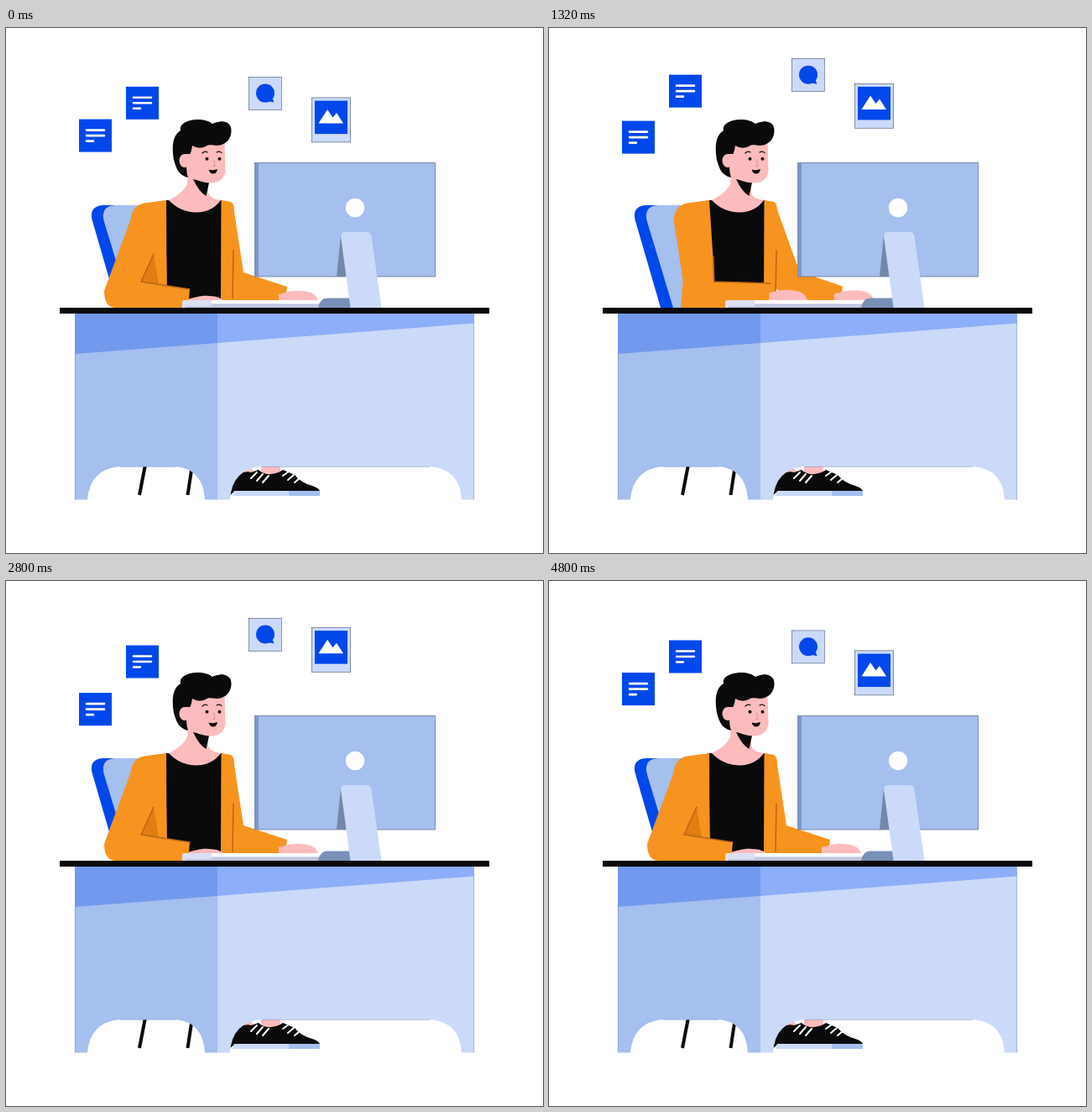
Recreate the animation shown at these times as an HTML page. Size 640 by 625 pixels, loop 4840 ms.

```html
<!DOCTYPE html>
<html lang="en">
<head>
<meta charset="utf-8">
<title>At the desk</title>
<style>
html, body { margin: 0; width: 100%; height: 100%; overflow: hidden; background: #fff; }
svg { display: block; width: 640px; height: 625px; }
.blue { fill: #0048ea; }
.mid { fill: #a5bfee; }
.pale { fill: #cbdaf9; }
.ink { fill: #0a0a0a; }
.skin { fill: #fcbcbd; }
.coat { fill: #f79420; }
.edge { stroke: #47566f; stroke-width: .6; }
.line { fill: none; stroke-linecap: round; stroke-linejoin: round; }
.white { stroke: #fff; stroke-width: 2.6; }
.crease { stroke: #b8651a; stroke-width: 1.5; }
</style>
</head>
<body>
<svg viewBox="0 0 640 625">
  <defs>
    <g id="note">
      <rect class="blue" width="39" height="39"/>
      <path class="line white" d="M9 13H30M9 19.5H30M9 26H17"/>
    </g>
    <path id="hand" class="skin" d="M-2 8C8 6 14 3 24 4C36 4 45 9 45 17V25H-2Z"/>
  </defs>

  <use id="noteA" href="#note"/>
  <use id="noteB" href="#note"/>
  <g id="bubble">
    <rect class="pale edge" x=".3" y=".3" width="39" height="39"/>
    <circle class="blue" cx="20" cy="19.5" r="11"/>
    <path class="blue" d="M23 29L30.500 30.500L28 24Z"/>
  </g>
  <g id="photo">
    <rect class="pale edge" x=".3" y=".3" width="46.400" height="53"/>
    <rect class="blue" x="4" y="4" width="39" height="39.500"/>
    <path fill="#fff" d="M8.500 31L19 14.500L25.500 24L30 18.500L38 31Z"/>
  </g>

  <path class="blue" d="M160 211H116Q99 212 102.500 228L133 333H165Z"/>
  <path class="mid" d="M165 211H130Q113 212 116.500 229L148 333H165Z"/>

  <path class="coat" d="M165 209L192 205V320H165Z"/>
  <path class="ink" d="M190 205H258V325H192Z"/>
  <path class="coat" d="M256.500 205L268 207Q272 209 272 218L271 324H256Z"/>
  <path id="armR" class="coat"/>
  <path class="line crease" d="M271 265L270 322"/>
  <use id="handR" href="#hand"/>

  <path class="skin" d="M217 174L216 185Q213 195 194 205Q207 219 227 219.500Q246 219 256 205Q242 203 241 196V178Z"/>
  <path class="ink" d="M223 180L242 184L238.500 200Q230 195 223 180Z"/>
  <path class="skin" d="M217 136H260.500L261.500 170Q260 184 244 184.500Q228 184 217 174Z"/>
  <path class="ink" d="M217 178C205 175 203 167 200 157C198 145 197 129 208 122C206 113 219 109 228 109C237 109 242 111 246 114C254 110 265 110 268 118C270 127 266 136 257 139C249 142 244 137 238 141Q230 145 222 140Q221 149 217 154Z"/>
  <ellipse class="skin" cx="213" cy="158" rx="6.500" ry="8"/>
  <path class="skin" d="M213 150H222V178H217Q215 172 215 164Z"/>
  <circle class="ink" cx="239.500" cy="155.800" r="2"/>
  <circle class="ink" cx="254.500" cy="155.800" r="2"/>
  <path class="line" stroke="#171313" stroke-width="1.200" d="M234 149Q237 146 240 148M251 148Q254 146 257 148.500"/>
  <path class="line" stroke="#e58b91" d="M247.500 157L249 164.500H246.500"/>
  <path class="ink" d="M241.500 168.500Q247 170 252 168Q251 173.500 247 173.500Q243 173.500 241.500 168.500Z"/>

  <use id="handL" href="#hand"/>
  <path id="armL" class="coat"/>
  <path id="fold" fill="#e27d12"/>
  <path id="foldLine" class="line crease"/>

  <rect class="mid edge" x="296.300" y="160.300" width="215.200" height="135.700"/>
  <path fill="#7e97c5" d="M296.300 160.300H301V296H296.300Z"/>
  <circle cx="416" cy="214" r="11.200" fill="#fff"/>

  <path fill="#dce0f5" d="M213 324H376V333H210V327Q210 324 213 324Z"/>
  <path fill="#fff" d="M245 324H376V328.500H245Z"/>
  <path fill="#c2c6e0" d="M213 331H245V328.500H376V333H214Z"/>
  <path fill="#7890b8" d="M372 333Q374 321.500 383 321.500H412V333Z"/>
  <path fill="#7587a9" d="M399 246L394 296H406L404 250Z"/>
  <path class="pale" d="M399 248Q399 243 404 243H430Q434.500 243 435.500 248L447.500 333H410.500Z"/>

  <path class="line" stroke="#0a0a0a" stroke-width="4" style="stroke-linecap:butt" d="M166 520L159 556M222 520L216.500 556"/>
  <path class="skin" d="M304 521H327V533H304ZM279 532Q283 524 290 521L296 530Z"/>
  <path class="ink" d="M266 557Q268 541 278 531Q285 527 292 529L301 526Q307 532 316 531Q325 530 330 526L344 532Q351 541 365 545Q372 547 374 551L272 552Z"/>
  <path class="pale" d="M272 551H374V557H270Z"/>
  <path fill="#a5bfee" d="M337 551H374V557H337Z"/>
  <path class="line white" style="stroke-width:2" d="M292 536L299 529M299 539L306 531M306 541L313 533M330 533L337 528M336 538L343 532M344 541L350 536"/>

  <path class="mid" d="M82 340H252V561.500H237Q235 525 202 522H136Q100 525 97 561.500H82Z"/>
  <path class="pale" d="M252 340H558V561.500H543Q541 525 505 522H305Q269 525 267 561.500H252Z"/>
  <path fill="#7299ee" d="M82 340H252V375L82 388Z"/>
  <path fill="#8daef8" d="M252 340H558V351.500L252 375Z"/>
  <path class="line" stroke="#7d98cd" stroke-width=".6" d="M82.300 388V561M136 522.300H202M305 522.300H505M557.700 351V561"/>
  <rect class="ink" x="64" y="333" width="512" height="7"/>
</svg>
<script>
const LOOP = 4840, STEP = 40;
const $ = id => document.getElementById(id);
const draw = (id, d) => $(id).setAttribute('d', d);
const move = (id, x, y) => $(id).setAttribute('transform', `translate(${x} ${y})`);

// floating cards: x, middle y, swing, time of the lowest point
const cards = {
  noteA: [143, 69.8, 14.3, 3630],
  noteB: [87, 119.1, 14.6, 3010],
  bubble: [289, 48, 14.6, 4220],
  photo: [364, 68, 14.6, 0]
};

// reach, elbow x y, elbow base x, crook x y, cuff x y, crease top x y
const leftPoses = [
  [0, 117, 313, 130, 161, 302, 219, 311, 176, 269],
  [.15, 124, 311, 136, 166, 301, 224, 304, 181, 266],
  [.41, 137, 309, 146, 177, 302, 236, 303, 185, 266],
  [1, 160, 300, 157, 197, 302, 264, 304, 196, 272]
];
// reach, elbow x y, cuff x y, underside x
const rightPoses = [
  [0, 283, 291, 335, 308, 270],
  [.56, 297, 290, 349, 308, 290],
  [.85, 312, 290, 358, 304, 312],
  [1, 315, 290, 362, 303, 315]
];

function pose(table, k) {
  let i = 1;
  while (i < table.length - 1 && k > table[i][0]) i++;
  const a = table[i - 1], b = table[i], f = (k - a[0]) / (b[0] - a[0]);
  return a.slice(1).map((v, j) => v + (b[j + 1] - v) * f);
}

function reach(t, start, peak, end) {
  if (t <= start || t >= end) return 0;
  const f = t < peak ? (t - start) / (peak - start) : (end - t) / (end - peak);
  return (1 - Math.cos(Math.PI * f)) / 2;
}

function leftArm(k) {
  const [ex, ey, base, ix, iy, cx, cy, tx, ty] = pose(leftPoses, k);
  const side = 191.5 + 6 * k * k;
  const sideY = iy + (cy - iy) * (side - ix) / (cx - ix);
  draw('armL', `M191 205L165 208.500Q150 211 148.500 228L${ex} ${ey}` +
    `Q${Math.min(ex, 157)} 332 ${base} 333H${cx - 2}L${cx} ${cy}L${side} ${sideY}Z`);
  const w = 21 * Math.max(0, 1 - k / .4);
  draw('fold', `M${tx} ${ty}L${ix} ${iy}L${ix + w} ${iy + w * .15}Z`);
  draw('foldLine', `M${tx} ${ty}L${ix} ${iy}L${cx} ${cy}`);
  move('handL', cx - 1, cy + 4);
}

function rightArm(k) {
  const [ex, ey, cx, cy, under] = pose(rightPoses, k);
  draw('armR', `M265 207Q271 208 271.500 215L${ex} ${ey}L${cx} ${cy}L${cx - 2} 324` +
    `H${under}Q${(under + 270) / 2} 318 270 310L262 300Z`);
  move('handR', cx - 8, cy + 1);
}

function render(t) {
  for (const id in cards) {
    const [x, mid, swing, low] = cards[id];
    move(id, x, mid + swing * Math.cos(2 * Math.PI * (t - low) / LOOP));
  }
  leftArm(reach(t, 0, 1240, 2500));
  rightArm(reach(t, 460, 2000, 2800));
}

const begin = performance.now();
function tick() {
  const t = (performance.now() - begin) % LOOP;
  render(Math.floor(t / STEP) * STEP);
  requestAnimationFrame(tick);
}
tick();
</script>
</body>
</html>
```
